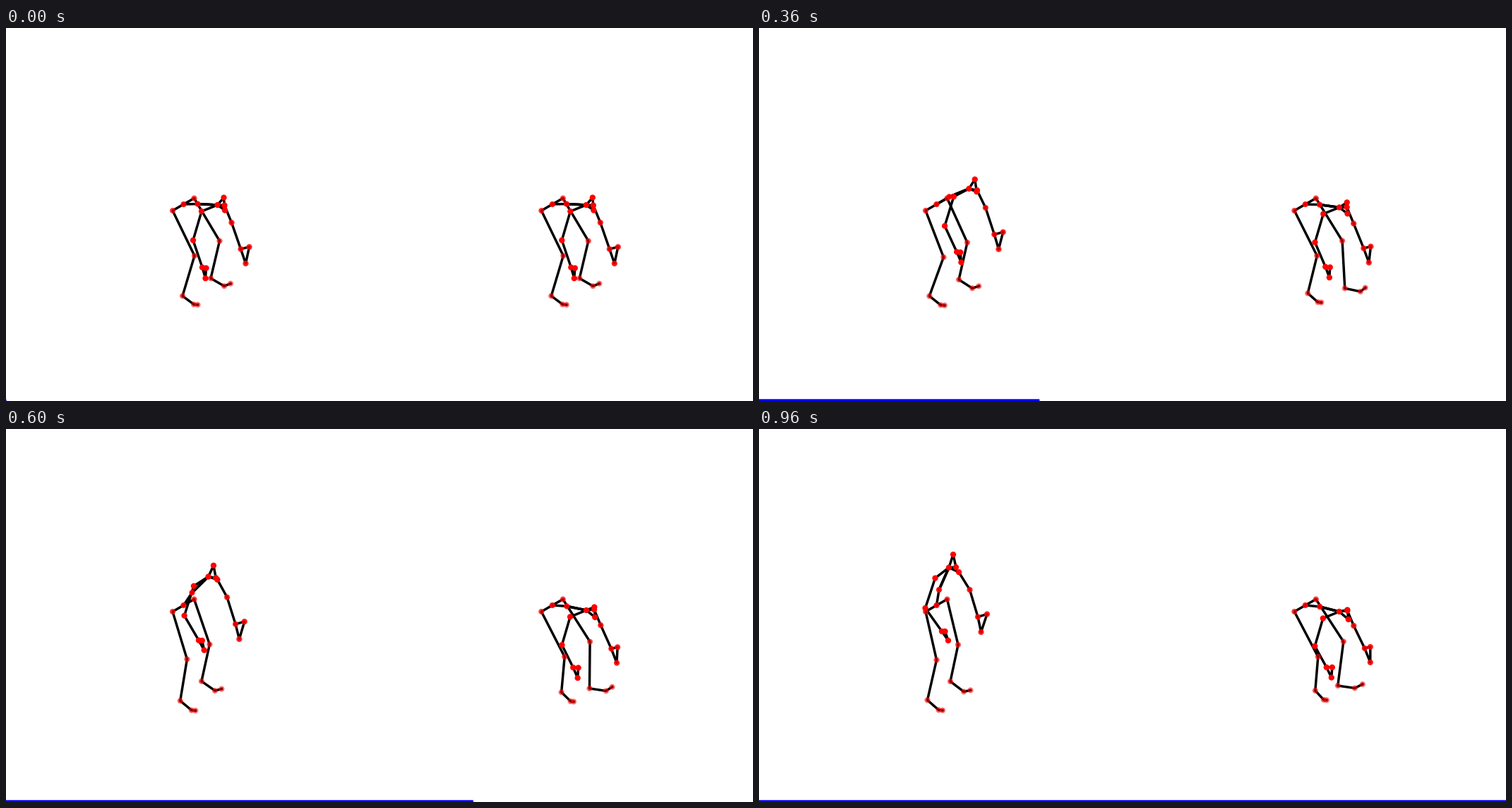
Write a matplotlib script that moves like this. It is 1058x529 px and loops after 1000 ms.

```python
import matplotlib.pyplot as plt
import numpy as np
from matplotlib.animation import FuncAnimation
from matplotlib.patches import Rectangle

W, H, DPI = 1058, 529, 100
FRAMES, INTERVAL = 25, 40

# bone tip: (parent, vector at rest, after rising, after bending), x + yj in pixels
BONES = {
    "hip_r": ("pelvis", -15.5 + 9j, -15.5 + 9j, -15.5 + 9j),
    "knee_r": ("hip_r", 31 + 64j, 15.5 + 68.5j, 33.5 + 64j),
    "ankle_r": ("knee_r", -17 + 57j, -13 + 57j, -4 + 48j),
    "foot_r": ("ankle_r", 16 + 12j, 16 + 14j, 12 + 13j),
    "toe_r": ("foot_r", 5.5 + 0.5j, 5.5 + 0.5j, 4 + 0.5j),
    "hip_l": ("pelvis", 15 - 8.5j, 15 - 8.5j, 15 - 8.5j),
    "knee_l": ("hip_l", 36 + 60.5j, 15.5 + 64.5j, 39 + 60j),
    "ankle_l": ("knee_l", -12.5 + 53j, -11 + 52j, -8 + 62.5j),
    "foot_l": ("ankle_l", 19 + 11j, 19 + 14.5j, 24 + 3.5j),
    "toe_l": ("foot_l", 9 - 3.5j, 9.5 - 2j, 11 - 5.5j),
    "spine": ("pelvis", 20 - 0.5j, 3.5 - 22j, 20.5 + 2j),
    "neck": ("spine", 28 + 1.5j, 14 - 31.5j, 27.5 + 7j),
    "head": ("neck", 9 - 10.5j, 6 - 18.5j, 11.5 - 2.5j),
    "nose": ("neck", 10.5 + 7.5j, 10 - 0.5j, 13 + 11j),
    "shoulder_a": ("neck", -22.5 + 9j, -19.5 + 15j, -23 + 9.5j),
    "elbow_a": ("shoulder_a", -12 + 41j, -14 + 42.5j, -11.5 + 39.5j),
    "wrist_a": ("elbow_a", 13 + 38.5j, 23.5 + 33j, 16.5 + 30j),
    "thumb_a": ("wrist_a", 5.5 + 1j, 4.5 + 0j, 8 + 0j),
    "finger_a": ("wrist_a", 4.5 + 15.5j, 9 + 13j, 7 + 14.5j),
    "shoulder_b": ("neck", 10 + 0.5j, 14 + 6.5j, 11.5 - 1.5j),
    "elbow_b": ("shoulder_b", 10 + 24.5j, 15.5 + 25j, 9 + 21.5j),
    "wrist_b": ("elbow_b", 13 + 37.5j, 11.5 + 38.5j, 15.5 + 32j),
    "thumb_b": ("wrist_b", 12 - 3j, 13 - 4j, 8 - 2j),
    "finger_b": ("wrist_b", 7 + 20.5j, 4.5 + 21.5j, 8 + 20j),
}

ARM = "spine neck shoulder_{0} elbow_{0} wrist_{0} thumb_{0} finger_{0} wrist_{0}"
LEG = "pelvis hip_{0} knee_{0} ankle_{0} foot_{0} toe_{0}"
CHAINS = [LEG.format("r").split(), LEG.format("l").split(),
          "pelvis spine neck head nose neck".split(),
          ARM.format("a").split(), ARM.format("b").split()]

# Dots farther from the viewer are fainter
LEG_ALPHA = {"hip": 0.64, "knee": 0.57, "ankle": 0.5, "foot": 0.46, "toe": 0.46}


def sway(x):
    """Back first, then forward."""
    return np.sin(2 * np.pi * x) * np.sin(np.pi * x)


def kick(x):
    """Quick swing out, slow return."""
    return np.sin(np.pi * x) * (1 - x)


def progress(x, lead):
    return x - 0.05 * np.sin(2 * np.pi * x) + lead * np.sin(np.pi * x)


def dot_alpha(name):
    part, _, side = name.partition("_")
    if part in LEG_ALPHA:
        return LEG_ALPHA[part]
    if part in ("pelvis", "spine"):
        return 0.85
    return 0.78 if side == "b" and part != "shoulder" else 1


class Skeleton:
    def __init__(self, ax, pelvis, pose, lead, swings):
        self.pelvis, self.pose, self.lead, self.swings = pelvis, pose, lead, swings
        self.lines = [ax.plot([], [], color="black", lw=2.5, zorder=1)[0] for _ in CHAINS]
        colors = [(1, 0, 0, dot_alpha(name)) for name in ("pelvis", *BONES)]
        self.dots = ax.scatter(*np.zeros((2, len(colors))), s=20, c=colors,
                               linewidths=1.5, zorder=2)

    def joints(self, x):
        s = progress(x, self.lead)
        tips = {"pelvis": self.pelvis}
        for name, (parent, rest, *ends) in BONES.items():
            # the complex power turns and stretches the bone evenly
            bone = rest * (ends[self.pose] / rest) ** s
            if name in self.swings:
                wave, reach = self.swings[name]
                bone += reach * wave(x)
            tips[name] = tips[parent] + bone
        return {name: (p.real, p.imag) for name, p in tips.items()}

    def update(self, x):
        tips = self.joints(x)
        for line, chain in zip(self.lines, CHAINS):
            line.set_data(*zip(*(tips[name] for name in chain)))
        self.dots.set_offsets(list(tips.values()))
        return [*self.lines, self.dots]


fig = plt.figure(figsize=(W / DPI, H / DPI), dpi=DPI, facecolor="white")
ax = fig.add_axes([0, 0, 1, 1])
ax.axis("off")

rising = Skeleton(ax, 251.5 + 250j, pose=0, lead=0.03,
                  swings={"ankle_r": (sway, -7 - 3j)})
bending = Skeleton(ax, 773.8 + 250j, pose=1, lead=0.1,
                   swings={"ankle_r": (sway, -3.5 + 0j), "ankle_l": (kick, 25 + 18j),
                           "foot_l": (kick, 1 - 6j), "toe_l": (kick, -5 - 2j)})
bar = ax.add_patch(Rectangle((0, H - 2), 0, 4, fc="blue", ec="blue", lw=1, snap=False))
ax.set_xlim(0, W)
ax.set_ylim(H, 0)


def draw(frame):
    x = frame / (FRAMES - 1)
    bar.set_width(W * x)
    return [bar, *rising.update(x), *bending.update(x)]


anim = FuncAnimation(fig, draw, frames=FRAMES, interval=INTERVAL,
                     repeat=True, repeat_delay=0, blit=False)
plt.show()
```
